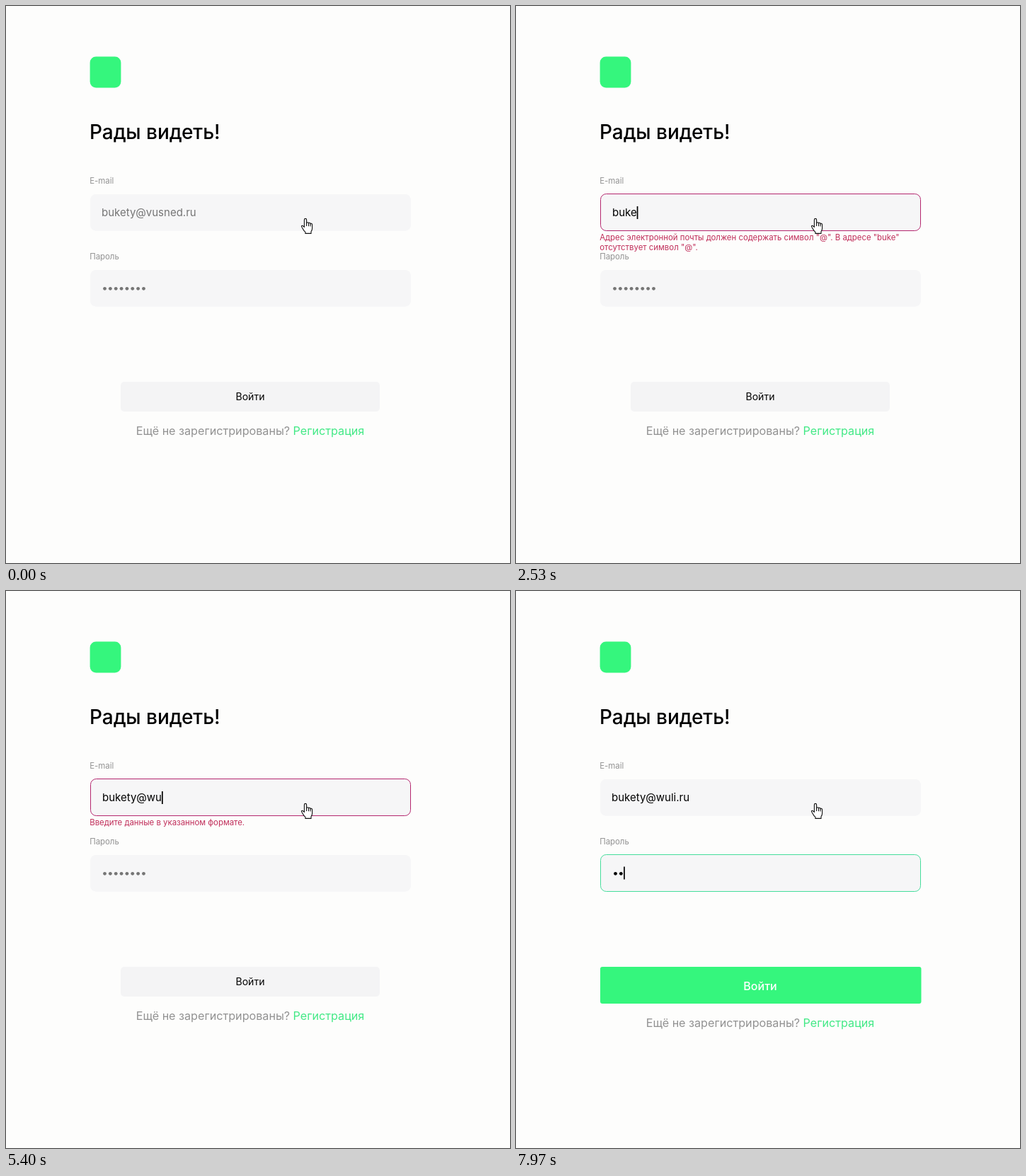
Animation, 712 px wide and 787 px high, one loop 8 s. Source, as an HTML page:

```html
<!DOCTYPE html>
<html lang="ru">
<head>
<meta charset="utf-8">
<title>Вход</title>
<style>
  html, body { margin: 0; width: 100%; height: 100%; overflow: hidden; background: #fdfdfc; }
  svg { display: block; width: 712px; height: 787px; font-family: Inter, Roboto, sans-serif; }
  text { white-space: pre; }
  .title { font-size: 28px; font-weight: 500; }
  .label { font-size: 11.4px; fill: #929292; }
  .error { font-size: 11.4px; fill: #c02e5a; }
  .input { font-size: 15px; }
  .foot { font-size: 16.15px; fill: #929292; text-anchor: middle; }
  .link { fill: #43e986; }
  .field { fill: #f6f6f7; }
  .brand { fill: #35f67d; }
  #go { text-anchor: middle; }
  .off #goBox { fill: #f4f4f5; }
  .off #go { font-size: 14px; }
  .on #goBox { fill: #35f67d; }
  .on #go { font-size: 16px; font-weight: 500; fill: #fff; }
</style>
</head>
<body>
<svg viewBox="0 0 712 787">
  <rect class="brand" x="118.6" y="71.6" width="43.8" height="43.8" rx="8.5"/>
  <text class="title" x="117.9" y="188">Рады видеть!</text>

  <text class="label" x="118.2" y="250.5">E-mail</text>
  <rect id="mailBox" class="field"/>
  <text id="mail" class="input" y="297"></text>
  <text id="err1" class="error" x="118.2" y="331.2"></text>
  <text id="err2" class="error" x="118.2" y="345"></text>

  <text class="label" x="118.2" y="357.5">Пароль</text>
  <rect id="passBox" class="field"/>
  <g id="dots"></g>
  <rect id="caret" width="1.7" height="18"/>

  <g id="button">
    <rect id="goBox" y="531"/>
    <text id="go" x="345">Войти</text>
  </g>
  <text id="foot" class="foot" x="345">Ещё не зарегистрированы? <tspan class="link">Регистрация</tspan></text>

  <g fill="#fff" stroke="#111" stroke-width="1.1" stroke-linejoin="round" stroke-linecap="round">
    <path d="M421.4 312.5V302.2Q421.4 300.4 423 300.4T424.6 302.2V307.2
      Q425 305.6 426.3 305.7T427.5 307.3Q427.8 306.1 429 306.3T430.1 308
      Q430.5 307 431.5 307.3T432.6 309V314Q432.6 317 431 318.6V321.4H422.9V319.4
      Q420.6 317.5 419 314.2Q417 311.4 417.6 310.6Q418.8 309.3 421.4 312.5Z"/>
    <path fill="none" d="M424.6 307.2V310.5M427.5 307.6V310.7M430.1 308.2V311"/>
  </g>
</svg>
<script>
const LOOP = 8000;
const HINT = 'bukety@vusned.ru';
const MAIL = 'bukety@wuli.ru';
const FOCUS = 330, TAB = 7130;
const mailKeys = [1970, 2130, 2290, 2450, 2830, 3000, 3950, 5080, 5250, 5430, 5600, 5980, 6260, 6420];
const passKeys = [7600, 7850];

const $ = id => document.getElementById(id);
const set = (el, attrs) => { for (const k in attrs) el.setAttribute(k, attrs[k]); };
const count = (keys, t) => keys.filter(k => k <= t).length;

for (let i = 0; i < 8; i++) {
  const dot = document.createElementNS('http://www.w3.org/2000/svg', 'circle');
  set(dot, { r: 2.4, cy: 399.3 });
  $('dots').append(dot);
}

function errorFor(value) {
  if (!value || value === MAIL) return ['', ''];
  if (!value.includes('@')) return [
    `Адрес электронной почты должен содержать символ "@". В адресе "${value}"`,
    'отсутствует символ "@".'
  ];
  if (value.endsWith('@')) return [`Введите часть адреса после символа "@". Адрес "${value}" неполный.`, ''];
  return ['Введите данные в указанном формате.', ''];
}

function drawBox(el, top, focused, color) {
  set(el, focused
    ? { x: 119.5, y: top - 0.5, width: 452, height: 52, rx: 8, stroke: color }
    : { x: 119, y: top, width: 453, height: 51.7, rx: 8, stroke: 'none' });
}

function draw(t) {
  const inMail = t >= FOCUS && t < TAB;
  const inPass = t >= TAB;
  const value = MAIL.slice(0, count(mailKeys, t));
  const typed = count(passKeys, t);
  const [line1, line2] = errorFor(value);

  drawBox($('mailBox'), 266, inMail, line1 ? '#b4266e' : '#45dd9b');
  drawBox($('passBox'), 373, inPass, '#45dd9b');

  const left = inMail ? 136 : 135;
  $('mail').textContent = value || HINT;
  set($('mail'), { x: left, fill: value ? '#000' : '#757575' });
  $('err1').textContent = line1;
  $('err2').textContent = line2;

  [...$('dots').children].forEach((dot, i) => set(dot, {
    cx: (inPass ? 140.5 : 139.5) + i * 7.85,
    fill: typed ? '#000' : '#757575',
    visibility: !typed || i < typed ? 'visible' : 'hidden'
  }));

  // The caret restarts its blink on every focus change or key press
  const last = Math.max(...[FOCUS, TAB, ...mailKeys, ...passKeys].filter(k => k <= t));
  const lit = t >= FOCUS && (t - last) % 1060 < 530;
  const end = inPass ? 136.4 + typed * 7.85 : left + (value ? $('mail').getComputedTextLength() : 0);
  set($('caret'), { x: end, y: inPass ? 389.5 : 283, visibility: lit ? 'visible' : 'hidden' });

  set($('button'), { class: typed ? 'on' : 'off' });
  set($('goBox'), typed
    ? { x: 119, width: 453.5, height: 52, rx: 3 }
    : { x: 162, width: 366, height: 42, rx: 5 });
  set($('go'), { y: typed ? 563.5 : 556.5 });
  set($('foot'), { y: typed ? 616 : 606 });
}

function tick() {
  draw(performance.now() % LOOP);
  requestAnimationFrame(tick);
}
tick();
</script>
</body>
</html>
```
